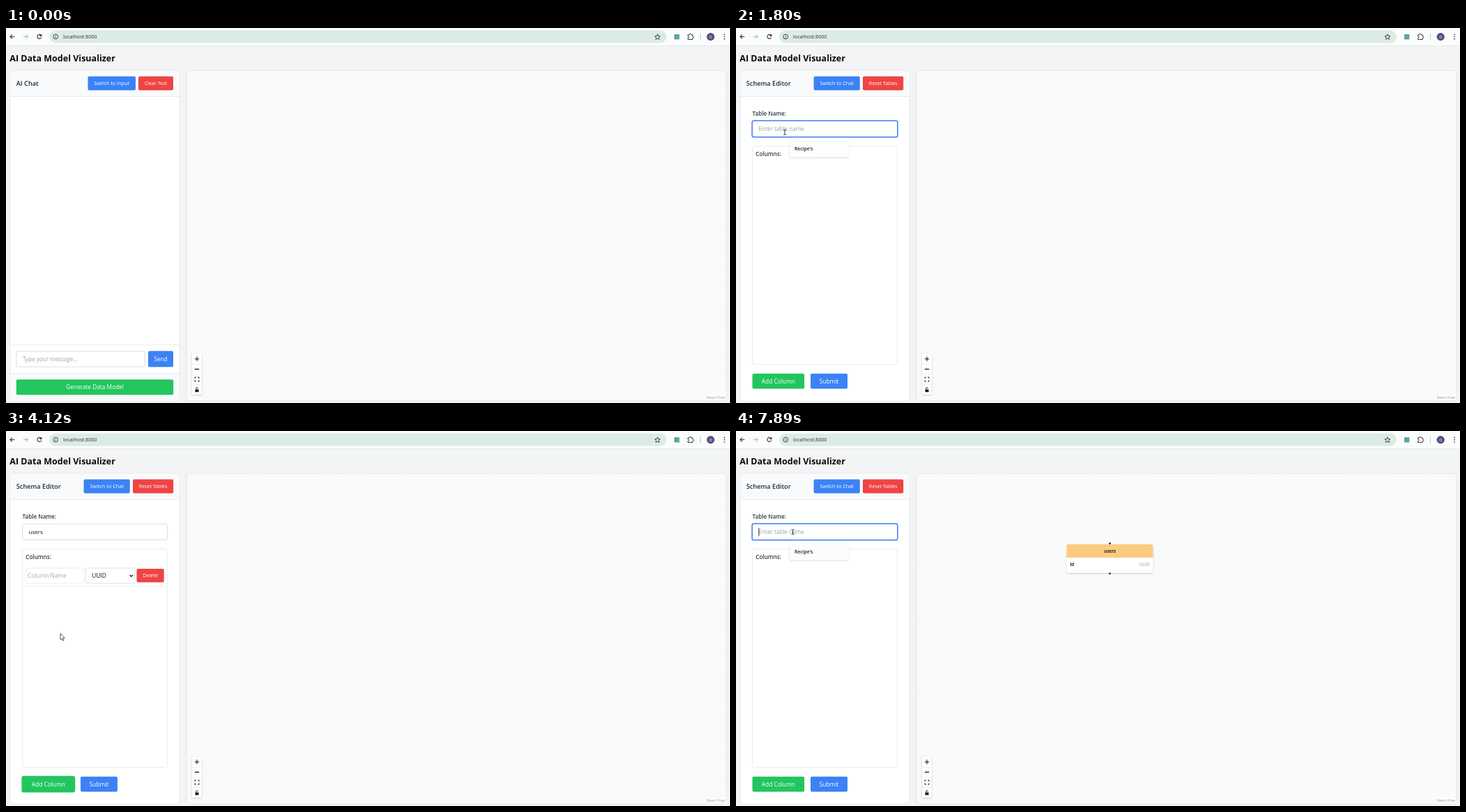
Recreate the animation shown at these times as an HTML page. Size 1039x539 px, loop 8000 ms.

```html
<!DOCTYPE html>
<html lang="en">
<head>
<meta charset="utf-8">
<title>AI Data Model Visualizer</title>
<style>
html, body { margin: 0; width: 100%; height: 100%; overflow: hidden; background: #f3f4f6; }
svg { display: block; width: 100%; height: 100%; font-family: "Open Sans", "Noto Sans", sans-serif; }
</style>
</head>
<body>
<svg id="stage" viewBox="0 0 1039 539" xmlns="http://www.w3.org/2000/svg"></svg>
<script>
const LOOP = 8000;
const BLUE = '#3b82f6', HOVER = '#2563eb', RED = '#ef4444', GREEN = '#22c55e';
const INK = '#1f2937', HINT = '#9ca3af', EDGE = '#d1d5db', LINE = '#e5e7eb';

const rect = (x, y, w, h, fill, extra = '') =>
  `<rect x="${x}" y="${y}" width="${w}" height="${h}" fill="${fill}" ${extra}/>`;
const text = (x, y, size, str, fill = INK, extra = '') =>
  `<text x="${x}" y="${y}" font-size="${size}" fill="${fill}" ${extra}>${str}</text>`;
const stroke = (d, color, width = 1, extra = '') =>
  `<path d="${d}" fill="none" stroke="${color}" stroke-width="${width}" ${extra}/>`;
const group = (id, body) => `<g id="${id}">${body}</g>`;
const field = (x, y, w, h, edge = EDGE) =>
  rect(x, y, w, h, '#fff', `rx="2" stroke="${edge}" stroke-width=".8"`);
const ring = (id, x, y, w, h, color) =>
  rect(x - .4, y - .4, w + .8, h + .8, 'none', `id="${id}" rx="2.6" stroke="${color}" stroke-width="1.5"`);
const button = (id, x, y, w, h, fill, label, size) =>
  rect(x, y, w, h, fill, `id="${id}" rx="2"`) +
  text(x + w / 2, y + h / 2 + size * .36, size, label, '#fff', 'text-anchor="middle"');
const caret = (id, y) => rect(0, y, .8, 12, '#111', `id="${id}"`);

const defs = `<defs>
  <pattern id="dots" x="259" y="61" width="10.82" height="10.82" patternUnits="userSpaceOnUse">
    <circle cx="5.4" cy="5.4" r=".45" fill="#dfe2e4"/>
  </pattern>
  <filter id="soft" x="-20%" y="-30%" width="140%" height="170%">
    <feDropShadow dx="0" dy=".8" stdDeviation="1.2" flood-color="#000" flood-opacity=".22"/>
  </filter>
</defs>`;

const browser = rect(0, 0, 1039, 25, '#fafdfb') +
  rect(0, 25, 1039, .8, '#e3e8e6') +
  rect(62, 3.5, 886, 18, '#dcece5', 'rx="9"') +
  stroke('M12.3 12.5H6M8.9 9.6L6 12.5L8.9 15.4', '#333', 1.1) +
  stroke('M25 12.5H31.3M28.4 9.6L31.3 12.5L28.4 15.4', '#a5aaa8', 1) +
  stroke('M50.3 10.5A3 3 0 1 0 50.8 13.4M50.9 9V11.4H48.4', '#333', 1.1) +
  '<circle cx="71.2" cy="12.5" r="3.4" fill="none" stroke="#333" stroke-width=".9"/>' +
  stroke('M71.2 12.1V14.5M71.2 10.5V11.3', '#333', .9) +
  text(82, 15.2, 7.2, 'localhost:8000', '#2b3330') +
  stroke('M935 8.8L936.1 11.5L939 11.7L936.8 13.6L937.5 16.4L935 14.9L932.5 16.4L933.2 13.6L931 11.7L933.9 11.5Z', '#333', .9) +
  rect(959, 9, 7.4, 7.4, '#58a7a0') +
  stroke('M978.7 9.8H981C980.6 7.6 983.6 7.6 983.2 9.8H985.4V12C987.4 11.7 987.4 14.5 985.4 14.2V16.4H978.7V14.2C980.6 14.3 980.6 11.8 978.7 12Z', '#333', 1) +
  rect(996, 8.5, .9, 8.5, '#8ed0e6') +
  '<circle cx="1011.2" cy="12.6" r="5.6" fill="#5c4a84"/>' +
  text(1011.2, 14.7, 5.6, 'D', '#fff', 'text-anchor="middle"') +
  [9.4, 12.6, 15.8].map(y => `<circle cx="1031" cy="${y}" r=".85" fill="#333"/>`).join('');

const panels = text(5.3, 48.4, 12.5, 'AI Data Model Visualizer', '#0b0b0c', 'font-weight="700"') +
  rect(6, 61, 243, 475, '#fff', 'rx="4" stroke="#e3e5e9" stroke-width=".8"') +
  rect(6.4, 61.4, 242.2, 37, '#f9fafc', 'rx="4"') +
  rect(6, 98, 243, .8, LINE) +
  rect(259, 61, 775, 475, '#f9fafa', 'rx="4" stroke="#dfe2e6" stroke-width=".9"') +
  rect(260, 62, 773, 473, 'url(#dots)') +
  rect(1004, 526, 29.5, 9, '#fcfcfc') +
  text(1006, 532.7, 5.2, 'React Flow', '#9a9a9a');

const controls = rect(267, 468.5, 14, 58.5, '#fefefe', 'filter="url(#soft)"') +
  [483, 497.7, 512.3].map(y => rect(267, y, 14, .6, '#e8e8e8')).join('') +
  stroke('M274 472.6V478.8M270.9 475.7H277.1M270.9 490.4H277.1', '#111', 1.1) +
  stroke('M271 503.6V502H272.8M275.2 502H277V503.6M277 506.4V508H275.2M272.8 508H271V506.4', '#111', 1) +
  rect(271.5, 519.4, 5, 3.9, '#111', 'rx=".6"') +
  stroke('M272.6 519.6V518.3A1.4 1.4 0 0 1 275.4 518.3', '#111', .9);

const chat = group('chat',
  text(14.8, 83.3, 9.2, 'AI Chat', INK, 'font-weight="600"') +
  ring('chatRing', 117.5, 69.5, 68.5, 20, BLUE) +
  button('chatSwitch', 117.5, 69.5, 68.5, 20, BLUE, 'Switch to Input', 7.25) +
  button('clear', 190, 69.5, 50, 20, RED, 'Clear Text', 7.05) +
  rect(6, 455.2, 243, .8, LINE) +
  field(14.8, 464.6, 184.5, 22.4) +
  text(24, 479, 8.05, 'Type your message...', HINT) +
  button('send', 204, 464.2, 36, 23, BLUE, 'Send', 8.1) +
  rect(6.4, 496.4, 242.2, 39.2, '#f9fafc', 'rx="3"') +
  rect(6, 496, 243, .8, LINE) +
  button('generate', 14.8, 505.3, 225.4, 22, GREEN, 'Generate Data Model', 8.3));

const columnRow = group('row',
  field(28.3, 197, 83.6, 22, LINE) +
  ring('colRing', 28.3, 197, 83.6, 22, BLUE) +
  text(31, 210.8, 8.3, 'Column Name', '#a3a8b0', 'id="colHint"') +
  text(31, 210.9, 8.2, '', '#111', 'id="colText"') + caret('colCaret', 201.5) +
  field(114.6, 197, 70.4, 22) +
  text(123.2, 211.4, 8.4, 'UUID', '#111') +
  stroke('M177.6 207L179.7 209.2L181.8 207', '#111', 1.2) +
  button('delete', 187.5, 198, 39.2, 19.5, RED, 'Delete', 7.25) +
  rect(28.3, 222.8, 198.5, .8, LINE));

const suggestion = group('suggest',
  rect(77.3, 163, 85, 22.5, '#fcfefc', 'rx="2.5" filter="url(#soft)"') +
  '<path d="M82.5 163.5L88.7 156.8L94.9 163.5Z" fill="#fcfefc"/>' +
  text(84, 176, 6.8, "Recipe's", '#1d211f', 'font-weight="600"'));

const schema = group('schema',
  text(14.8, 83.3, 9.2, 'Schema Editor', INK, 'font-weight="600"') +
  ring('schemaRing', 111.6, 69.5, 66.2, 20, BLUE) +
  button('schemaSwitch', 111.6, 69.5, 66.2, 20, BLUE, 'Switch to Chat', 7.25) +
  button('reset', 182, 69.5, 58.2, 20, RED, 'Reset Tables', 7.05) +
  text(23.5, 126, 8.15, 'Table Name:', '#303a48', 'font-weight="600"') +
  field(23.5, 133.6, 208, 22.8) +
  ring('nameRing', 23.5, 133.6, 208, 22.8, BLUE) +
  text(32.6, 148.2, 8.12, 'Enter table name', HINT, 'id="nameHint"') +
  text(32.6, 148.2, 8, '', '#111', 'id="nameText"') + caret('nameCaret', 139.3) +
  field(23.5, 169.8, 208, 313.7, LINE) +
  text(28.3, 184.3, 8.15, 'Columns:', '#303a48', 'font-weight="600"') +
  columnRow +
  ring('addRing', 23.5, 496.8, 74.6, 21.6, GREEN) +
  button('add', 23.5, 496.8, 74.6, 21.6, GREEN, 'Add Column', 8.35) +
  ring('submitRing', 107, 496.8, 53, 21.6, BLUE) +
  button('submit', 107, 496.8, 53, 21.6, BLUE, 'Submit', 8.3) +
  suggestion);

const node = group('node',
  rect(474.6, 162.8, 123.8, 41.2, '#fff', 'rx="3" filter="url(#soft)"') +
  '<path d="M474.6 182V165.8Q474.6 162.8 477.6 162.8H595.4Q598.4 162.8 598.4 165.8V182Z" fill="#fdcb80"/>' +
  '<circle cx="536.5" cy="161.6" r="1.4" fill="#222"/><circle cx="536.5" cy="204.8" r="1.4" fill="#222"/>' +
  text(536.7, 175.1, 6.2, 'users', '#222', 'text-anchor="middle" font-weight="700"') +
  text(479.4, 194.4, 6.2, 'id', '#222', 'font-weight="700"') +
  text(593.6, 194.4, 6.5, 'UUID', HINT, 'text-anchor="end" font-style="italic"'));

const pointer = group('pointer',
  '<circle id="click" r="6.4" fill="#ffeb00" fill-opacity=".62"/>' +
  '<path id="arrow" d="M0 0V9.2L2.1 7.3L3.5 10.4L4.9 9.8L3.5 6.8H6.3Z" fill="#fff" stroke="#222" stroke-width=".75"/>' +
  '<path id="hand" d="M-.9 .6Q.2 -.8 1.1 .6V4.4L4.1 5Q5.3 5.3 5.2 6.6L4.6 9.8L3.9 11.4H-.7L-3 7.6Q-3.4 6.3 -2.2 6.4L-.9 7.6Z" fill="#fff" stroke="#222" stroke-width=".7"/>' +
  `<g id="beam">${stroke('M-1.8 -3.6Q0 -3.6 0 -2.6Q0 -3.6 1.8 -3.6M0 -2.6V2.6M-1.8 3.6Q0 3.6 0 2.6Q0 3.6 1.8 3.6', '#222', .9)}</g>`);

const stage = document.getElementById('stage');
stage.innerHTML = defs + browser + panels + controls + chat + schema + node + pointer;

const el = {};
stage.querySelectorAll('[id]').forEach(e => el[e.id] = e);
const show = (id, on) => { el[id].style.display = on ? '' : 'none'; };
const tint = (id, on) => el[id].setAttribute('fill', on ? HOVER : BLUE);
const within = (t, a, b) => t >= a && t < b;
const typed = (t, keys, word) => word.slice(0, keys.filter(k => t >= k).length);

// time, x, y of the pointer
const path = [
  [70, 968, 290], [600, 136, 79], [660, 134, 76], [860, 134, 76], [1200, 70, 150],
  [3259, 70, 150], [3260, 77, 204], [3660, 86, 502], [3830, 86, 502], [4120, 78, 291],
  [4450, 82, 208], [5709, 82, 208], [5910, 107, 498.6], [7330, 107, 498.6], [7760, 81.5, 145]
];
const clicks = [660, 1230, 3730, 4480, 7050, 7750];
const hidden = [[0, 70], [2400, 3260], [5110, 5710]];

function pointerAt(t) {
  const i = path.findIndex(p => p[0] > t);
  if (i === 0) return path[0].slice(1);
  if (i < 0) return path[path.length - 1].slice(1);
  const [t0, x0, y0] = path[i - 1], [t1, x1, y1] = path[i];
  const u = (t - t0) / (t1 - t0), k = u * u * (3 - 2 * u);
  return [x0 + (x1 - x0) * k, y0 + (y1 - y0) * k];
}

function putText(prefix, value, caretOn) {
  const node = el[prefix + 'Text'];
  node.textContent = value;
  show(prefix + 'Hint', !value);
  show(prefix + 'Caret', caretOn);
  if (caretOn) {
    const left = +node.getAttribute('x');
    el[prefix + 'Caret'].setAttribute('x', left + (value ? node.getComputedTextLength() : -.2));
  }
}

function render(t) {
  const form = t >= 800, sent = t >= 7160;
  const [x, y] = pointerAt(t);
  const over = (x0, y0, x1, y1) => x >= x0 && x <= x1 && y >= y0 && y <= y1;

  show('chat', !form);
  show('schema', form);
  show('chatRing', t >= 660);
  show('schemaRing', t < 1260);
  tint('chatSwitch', t >= 70 && over(117, 69, 186, 90));
  tint('schemaSwitch', over(111, 69, 178, 90));

  show('nameRing', within(t, 1260, 3730) || t >= 7790);
  show('suggest', within(t, 1320, 2400) || t >= 7850);
  const nameCaret = within(t, 1260, 1800) || within(t, 2330, 3520) || t >= 7790;
  putText('name', sent ? '' : typed(t, [2400, 2460, 2600, 2870, 2990], 'users'), nameCaret);

  const row = within(t, 3800, 7160);
  show('row', row);
  show('colRing', within(t, 4510, 7090));
  const colCaret = within(t, 4510, 5040) || within(t, 5110, 5770) || within(t, 6300, 6760);
  if (row) putText('col', typed(t, [5110, 5240], 'id'), colCaret);

  show('addRing', within(t, 3730, 4510));
  show('submitRing', within(t, 7080, 7790));
  el.add.setAttribute('fill', over(23, 497, 98, 518) ? '#16a34a' : GREEN);
  const onSubmit = over(106.5, 497, 160, 518);
  tint('submit', onSubmit);
  show('node', sent);

  const inName = form && over(23, 133, 232, 157), inCol = row && over(28, 197, 112, 219);
  const onButton = over(111, 69, 186, 90) || onSubmit || form && over(23, 497, 98, 518);
  show('pointer', !hidden.some(([a, b]) => within(t, a, b)));
  el.pointer.setAttribute('transform', `translate(${x.toFixed(2)} ${y.toFixed(2)})`);
  show('beam', inName || inCol);
  show('hand', onButton);
  show('arrow', !inName && !inCol && !onButton);
  show('click', clicks.some(c => within(t, c, c + 130)));
}

const start = performance.now();
function tick() {
  render((performance.now() - start) % LOOP);
  requestAnimationFrame(tick);
}
tick();
</script>
</body>
</html>
```
